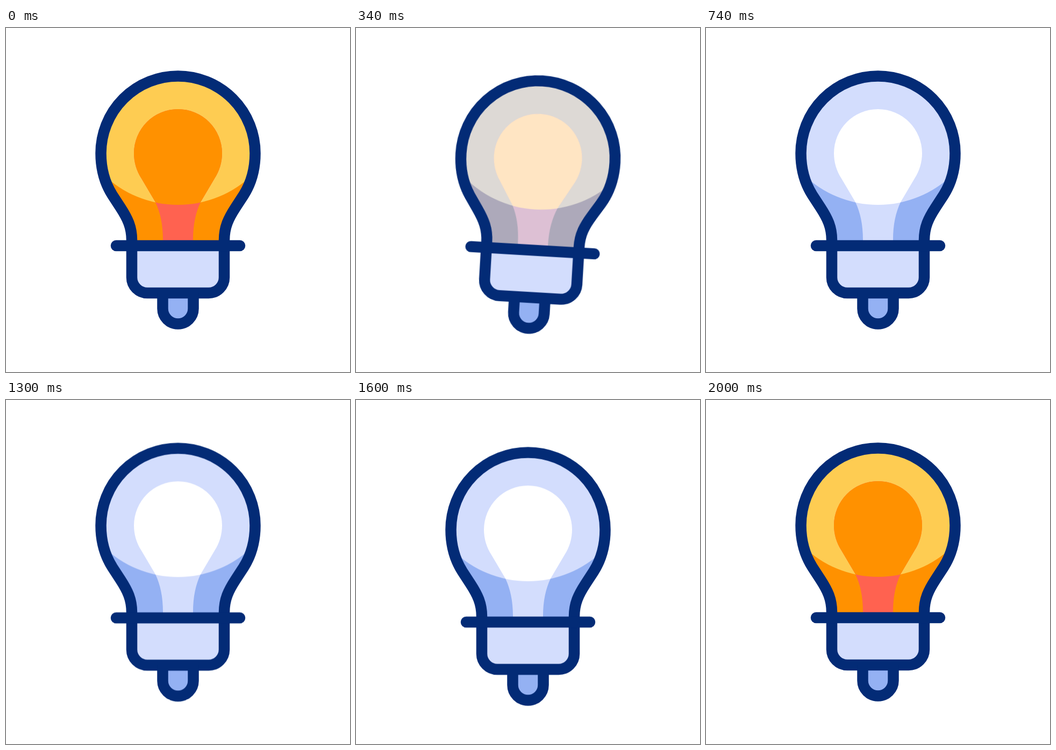
An HTML page without scripts that plays this animation: 640x640 px, repeating every 2.4 s.

```html
<!DOCTYPE html>
<html lang="en">
<head>
<meta charset="utf-8">
<title>Light bulb</title>
<style>
  html, body { margin: 0; width: 100%; height: 100%; overflow: hidden; background: #fff; }
  svg { display: block; width: 100%; height: 100%; }

  .press, .sway, .on, .rays path { animation: 2400ms linear infinite; }
  .press { animation-name: press; }
  .sway { animation-name: sway; transform-origin: 320px 550px; }
  .on { animation-name: light; --top: #fecc52; --low: #ff9100; --core: #ff9100; --stem: #ff6250; }
  .off { --top: #d3ddfd; --low: #94b1f3; --core: #fff; --stem: #d3ddfd; }

  .line { fill: none; stroke: #032b76; stroke-width: 20.5; stroke-linecap: round; }
  .rays { fill: none; stroke: #fecc52; stroke-width: 20; stroke-linecap: round; }
  .rays path { --tail: 35; --len: 41; animation-name: burst; visibility: hidden; }
  .rays .free { --tail: 53; --len: 23; }

  /* Pushed down and released, once per switch */
  @keyframes press {
    0%, 52.5% { transform: translateY(0); animation-timing-function: cubic-bezier(.4, 0, .8, .75); }
    11.667%, 64.167% { transform: translateY(11.3px); animation-timing-function: cubic-bezier(.2, .45, .5, 1); }
    30.833%, 83.333%, 100% { transform: translateY(0); }
  }
  @keyframes sway {
    0% { transform: rotate(0deg); animation-timing-function: ease-in-out; }
    7.708% { transform: rotate(-4.7deg); animation-timing-function: ease-in-out; }
    16.667% { transform: rotate(4.85deg); animation-timing-function: ease-in-out; }
    30.833%, 100% { transform: rotate(0deg); }
  }
  @keyframes light {
    0%, 11.667% { opacity: 1; }
    15%, 67.5% { opacity: 0; }
    70.833%, 100% { opacity: 1; }
  }
  @keyframes burst {
    0% { visibility: hidden; stroke-dasharray: 0 300; stroke-dashoffset: 0; }
    3.333% { visibility: visible; stroke-dasharray: 0 300; stroke-dashoffset: 0; }
    9.167% { visibility: visible; stroke-dasharray: var(--len) 300; stroke-dashoffset: calc(var(--tail) * -1); }
    14.167% { visibility: visible; stroke-dasharray: 0 300; stroke-dashoffset: -100; }
    14.168%, 100% { visibility: hidden; stroke-dasharray: 0 300; stroke-dashoffset: -100; }
  }
</style>
</head>
<body>
<svg viewBox="0 0 640 640">
  <defs>
    <path id="glass" d="M234 405V395C234 370 226 354 213 334L198 311C184 289 176.5 262 176.5 233A143.5 143.5 0 0 1 463.5 233C463.5 262 456 289 442 311L427 334C414 354 406 370 406 395V405"/>
    <path id="inner" d="M292 405V395C292 365 287 343 278 324L252 280C243 266 238 250 238 233A82 82 0 0 1 402 233C402 250 397 266 388 280L362 324C353 343 348 365 348 395V405"/>
    <path id="base" d="M234 405V464A29 29 0 0 0 263 493H377A29 29 0 0 0 406 464V405"/>
    <path id="tip" d="M291.5 493V522A28.5 28.5 0 0 0 348.5 522V493"/>
    <clipPath id="inGlass"><use href="#glass"/></clipPath>
    <clipPath id="inInner"><use href="#inner"/></clipPath>
    <g id="fill">
      <use href="#glass" fill="var(--low)"/>
      <circle cx="320" cy="130" r="199" fill="var(--top)" clip-path="url(#inGlass)"/>
      <use href="#inner" fill="var(--stem)"/>
      <circle cx="320" cy="130" r="199" fill="var(--core)" clip-path="url(#inInner)"/>
    </g>
  </defs>

  <g class="rays">
    <path pathLength="100" d="M220 184L129 113"/>
    <path pathLength="100" d="M390 200L504 144"/>
    <path pathLength="100" d="M198 297L102 303.5"/>
    <path pathLength="100" d="M401 301.5L530 310" class="free"/>
  </g>

  <g class="press">
    <g class="sway">
      <use href="#fill" class="off"/>
      <use href="#fill" class="on"/>
      <use href="#tip" fill="#94b1f3"/>
      <use href="#base" fill="#d3ddfd"/>
      <g class="line">
        <use href="#glass"/>
        <use href="#base"/>
        <use href="#tip" stroke-linecap="butt"/>
        <path d="M205 405H435"/>
      </g>
    </g>
  </g>
</svg>
</body>
</html>
```
